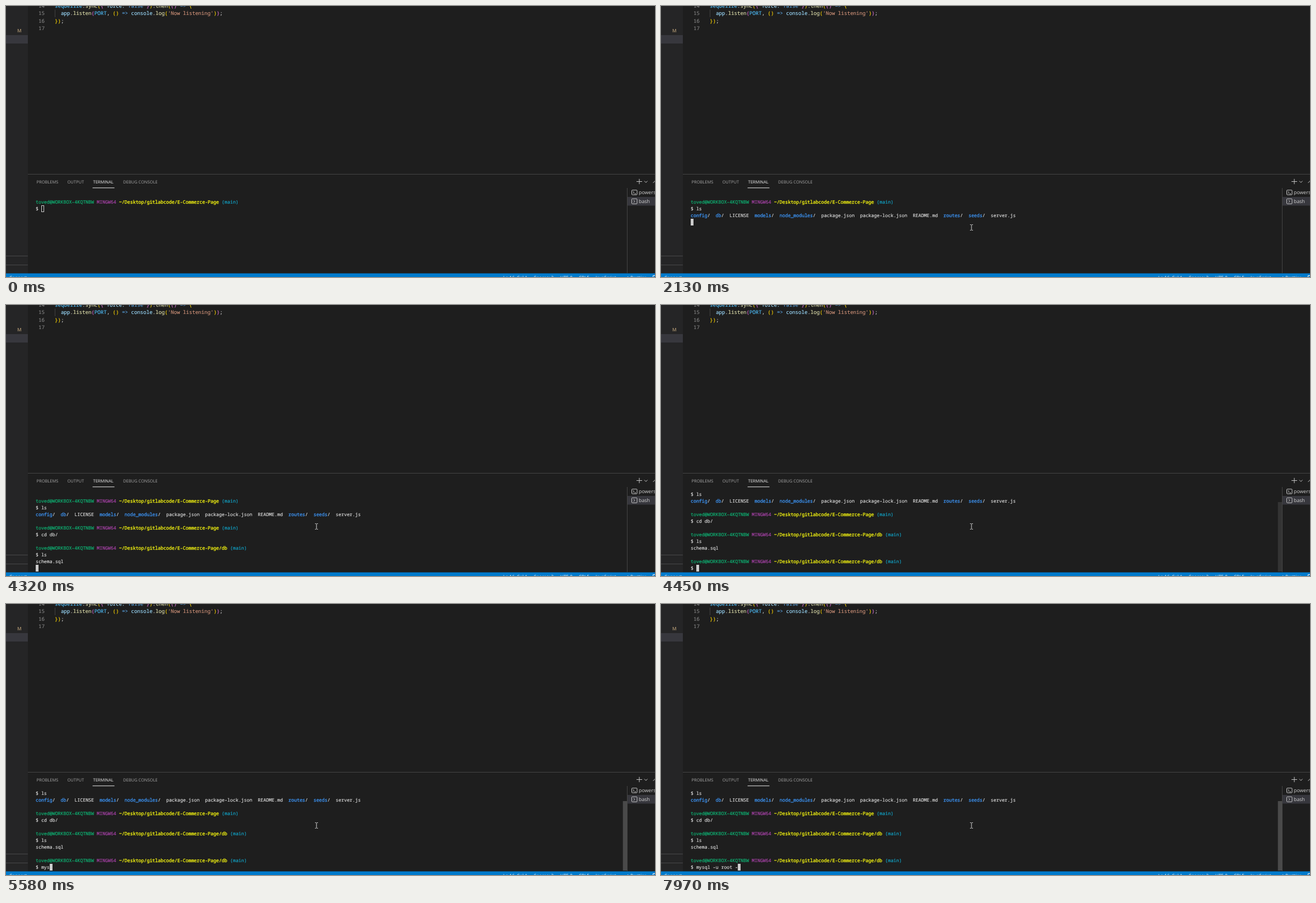
An HTML page that plays this animation: 1158x484 px, repeating every 8 s.

```html
<!DOCTYPE html>
<html lang="en">
<head>
<meta charset="utf-8">
<title>Terminal session</title>
<style>
  html, body { margin: 0; width: 100%; height: 100%; overflow: hidden; background: #1e1e1e; }
  svg { display: block; width: 100vw; height: 100vh; }
  text { white-space: pre; text-rendering: geometricPrecision; }
  .ui { font-family: "Open Sans", "Noto Sans", sans-serif; }
  .mono { font-family: "Noto Sans Mono", "DejaVu Sans Mono", monospace; }
  .line { fill: none; stroke: #c5c5c5; }
</style>
</head>
<body>
<svg viewBox="0 0 1158 484" preserveAspectRatio="none">
  <rect width="1158" height="484" fill="#1e1e1e"/>

  <!-- side bar -->
  <rect width="39" height="478" fill="#252526"/>
  <rect y="52" width="39" height="15" fill="#37373d"/>
  <path d="M0 446.5H39M0 462.5H39" stroke="#47474a"/>
  <text class="ui" x="20" y="47" font-size="8.4" font-weight="600" fill="#a8916e">M</text>

  <!-- editor -->
  <path d="M87.5 6.5V20" stroke="#404040"/>
  <g id="code" class="mono" font-size="9.08"></g>

  <!-- panel -->
  <path d="M39 300.5H1158M1108.5 325V477" stroke="#444"/>
  <g class="ui" font-size="7.5" fill="#a6a6a6">
    <text x="54.5" y="316.7">PROBLEMS</text>
    <text x="109.5" y="316.7">OUTPUT</text>
    <text x="155.5" y="316.7" fill="#f0f0f0">TERMINAL</text>
    <text x="209" y="316.7">DEBUG CONSOLE</text>
  </g>
  <path d="M154.5 324.8H193.5" stroke="#e7e7e7"/>
  <path class="line" d="M1125 313.5H1135M1130 308.8V318.2"/>
  <path class="line" d="M1139 312.5L1141.8 315.3L1144.6 312.5M1154.5 316L1158.5 312"/>

  <rect x="1109" y="341" width="49" height="15.5" fill="#37373d"/>
  <g class="line">
    <rect x="1116.5" y="328.8" width="9.5" height="8.4" rx="1"/>
    <path d="M1118.5 331L1120.7 333L1118.5 335M1121.3 335.3H1124"/>
    <rect x="1116.5" y="344.3" width="9.5" height="9" rx="1"/>
    <path d="M1119.7 346.5L1122 348.8L1119.7 351.1"/>
  </g>
  <g class="ui" font-size="8.8" fill="#d4d4d4">
    <text x="1129" y="336.3">powershell</text>
    <text x="1129" y="352">bash</text>
  </g>

  <rect id="bar" x="1100.7" y="352" width="7.3" height="124" fill="#4a4a4a"/>
  <g id="term" class="mono" font-size="8.26"></g>
  <rect id="cursor"/>

  <!-- status bar -->
  <rect y="477.5" width="1158" height="6.5" fill="#007acc"/>
  <g class="ui" font-size="8.1" fill="#fff">
    <text x="6" y="488">Connect</text>
    <text x="887" y="488">Ln 16, Col 1</text>
    <text x="942" y="488">Spaces: 2</text>
    <text x="989" y="488">UTF-8</text>
    <text x="1022" y="488">CRLF</text>
    <text x="1052" y="488">JavaScript</text>
    <text x="1105" y="488">✓ Prettier</text>
  </g>
  <path d="M1158 481.5H1154.5V484" fill="none" stroke="#fff"/>

  <path id="mouse" fill="none" stroke="#dcdcdc"
        d="M-2.5 -5H-.6M.6 -5H2.5M0 -4.5V4.5M-2.5 5H-.6M.6 5H2.5"/>
</svg>

<script>
const LOOP = 8000;
const CELL = 4.957, ROW = 12, LEFT = 53, TOP = 332, ROWS = 12;
const FG = '#e0e0e0', CURSOR = '#cccccc';
const $ = id => document.getElementById(id);

const esc = s => s.replace(/&/g, '&amp;').replace(/</g, '&lt;');

// Lay out runs [text, colour, outline] on a character grid; the outline thickens the strokes.
function runs(list, x, y, cell) {
  let col = 0;
  return list.map(([text, color, outline = 0.15]) => {
    const left = (x + col * cell).toFixed(2);
    col += text.length;
    return `<text x="${left}" y="${y}" fill="${color}" stroke="${color}" stroke-width="${outline}">${esc(text)}</text>`;
  }).join('');
}

// ---- editor ----
const C = { name: '#9cdcfe', cst: '#4fc1ff', fn: '#dcdcaa', key: '#569cd6', str: '#ce9178',
            txt: '#d4d4d4', b1: '#ffd700', b2: '#da70d6', b3: '#179fff' };
const paint = spec => spec.map(([text, kind]) => [text, C[kind]]);
const code = [
  [['sequelize', 'cst'], ['.', 'txt'], ['sync', 'fn'], ['(', 'b1'], ['{ ', 'b2'], ['force:', 'name'],
   [' false', 'key'], [' }', 'b2'], [')', 'b1'], ['.', 'txt'], ['then', 'fn'], ['(', 'b1'],
   ['()', 'b2'], [' =>', 'key'], [' {', 'b1']],
  [['  app', 'name'], ['.', 'txt'], ['listen', 'fn'], ['(', 'b2'], ['PORT', 'cst'], [', ', 'txt'],
   ['()', 'b1'], [' =>', 'key'], [' console', 'name'], ['.', 'txt'], ['log', 'fn'], ['(', 'b1'],
   ["'Now listening'", 'str'], [')', 'b1'], [')', 'b2'], [';', 'txt']],
  [['}', 'b1'], [')', 'b1'], [';', 'txt']],
  []
];
$('code').innerHTML = code.map((line, i) => {
  const y = 2.8 + i * 13.5;
  return runs([[String(14 + i), '#858585']], 58, y, 5.45) + runs(paint(line), 87, y, 5.45);
}).join('');

// ---- terminal session ----
const prompt = dir => [
  '\n', ['toved@WORKBOX-4KQTNBW', '#0dbc79'], ' ', ['MINGW64', '#b245b2'], ' ',
  ['~/Desktop/gitlabcode/E-Commerce-Page' + dir, '#f0f010', 0.35], ' ', ['(main)', '#11a8cd'], '\n$ '
];
const listing = ('config/ db/ LICENSE models/ node_modules/ package.json package-lock.json ' +
  'README.md routes/ seeds/ server.js').split(' ').flatMap(name =>
    name.endsWith('/') ? [[name.slice(0, -1), '#3b8eea', 0.35], '/  '] : [name + '  ']);

const events = [
  [0, prompt('')],
  [1860, ['l']], [1930, ['s']], [2060, ['\n']], [2130, [...listing, '\n']], [2260, prompt('')],
  [2590, ['c']], [2660, ['d']], [2720, [' ']], [2860, ['d']], [2990, ['b']], [3120, ['/']],
  [3250, ['\n']], [3390, prompt('/db')],
  [4120, ['l']], [4180, ['s']], [4320, ['\nschema.sql\n']], [4450, prompt('/db')],
  [5180, ['m']], [5450, ['y']], [5520, ['s']], [5650, ['q']], [5710, ['l']],
  [6380, [' ']], [6510, ['-']], [6840, ['u']], [6980, [' ']], [7240, ['r']],
  [7380, ['o']], [7440, ['o']], [7580, ['t']], [7780, [' ']], [7970, ['-']]
];

function addRun(line, run) {
  const last = line[line.length - 1];
  if (last && last[1] === run[1] && last[2] === run[2]) last[0] += run[0];
  else line.push([...run]);
}

function linesAfter(count) {
  const lines = [[]];
  for (const piece of events.slice(0, count).flatMap(e => e[1])) {
    const [text, ...style] = Array.isArray(piece) ? piece : [piece, FG];
    text.split('\n').forEach((part, i) => {
      if (i) lines.push([]);
      if (part) addRun(lines[lines.length - 1], [part, ...style]);
    });
  }
  return lines;
}

function setAttrs(el, attrs) {
  for (const key in attrs) el.setAttribute(key, attrs[key]);
}

let shown = -1, cursorX = 0, cursorY = 0;
function drawTerminal(count) {
  if (count === shown) return;
  shown = count;
  const lines = linesAfter(count);
  const visible = lines.slice(-ROWS);
  $('term').innerHTML = visible.map((line, i) => runs(line, LEFT, TOP + i * ROW + 9, CELL)).join('');
  const col = lines[lines.length - 1].reduce((sum, run) => sum + run[0].length, 0);
  cursorX = Math.round(LEFT + col * CELL);
  cursorY = TOP + (visible.length - 1) * ROW;
}

function drawCursor(focused) {
  const inset = focused ? 0 : 0.5;
  setAttrs($('cursor'), {
    x: cursorX + inset, y: cursorY + inset,
    width: 5 - 2 * inset, height: ROW - 2 * inset,
    fill: focused ? CURSOR : 'none', stroke: focused ? 'none' : CURSOR
  });
}

// The pointer comes in from the lower right, moving in short hops.
function drawMouse(t) {
  const p = Math.min(1, Math.floor((t - 70) / 81) / 8);
  const e = p * p * (3 - 2 * p);
  const x = Math.round(1011 - 457 * e), y = Math.round(465 - 70 * e) + 0.5;
  setAttrs($('mouse'), { transform: `translate(${x} ${y})`, visibility: t < 70 ? 'hidden' : 'visible' });
}

function render(t) {
  drawTerminal(events.filter(e => e[0] <= t).length);
  drawCursor(t >= 800);
  drawMouse(t);
  $('bar').setAttribute('opacity', t < 4450 ? 0 : t < 4520 ? 0.5 : 1);
}

function tick(now) {
  render(now % LOOP);
  requestAnimationFrame(tick);
}
render(0);
requestAnimationFrame(tick);
</script>
</body>
</html>
```
